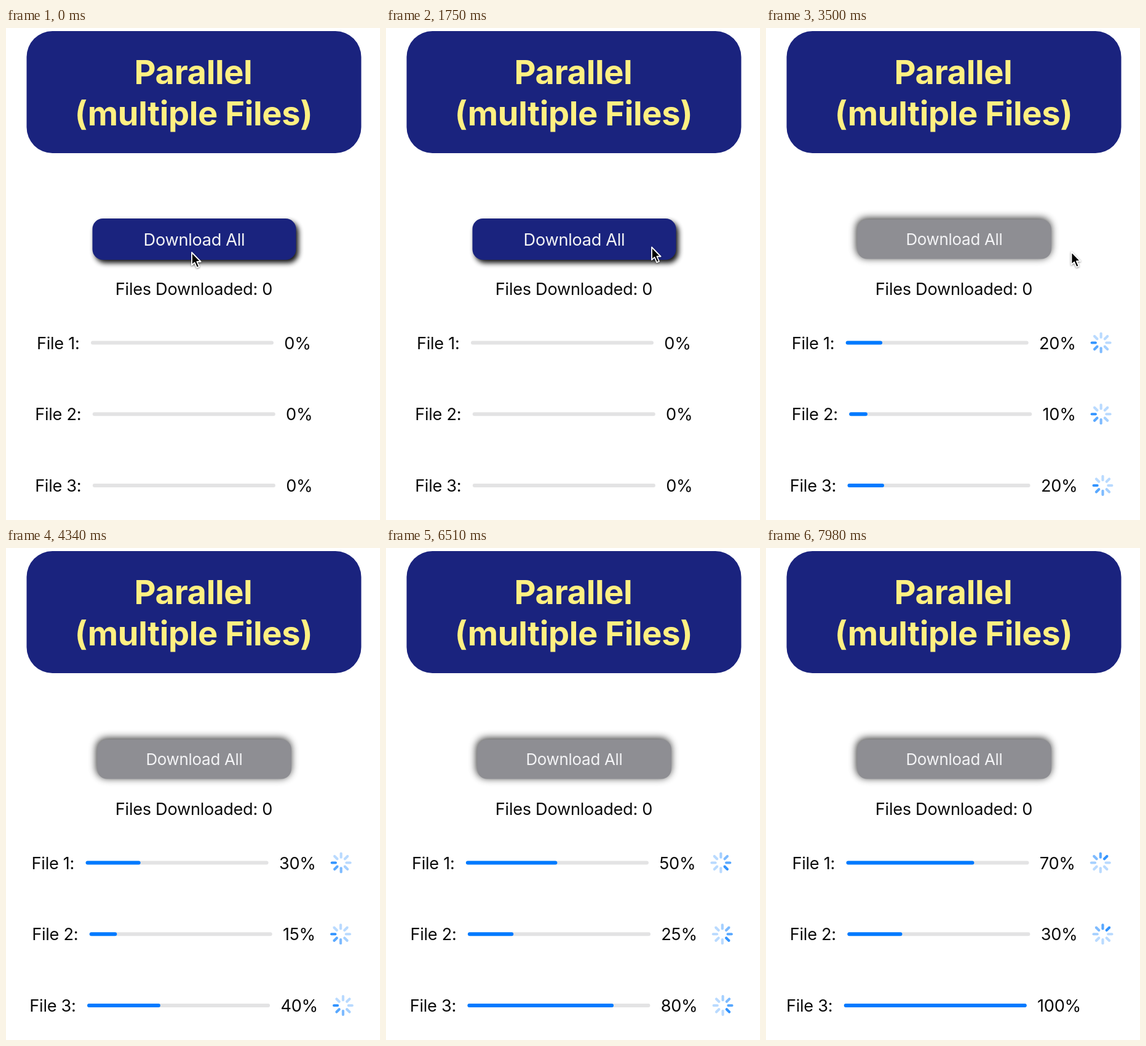
An HTML page for the animation above (8 s loop, 608 px wide and 798 px high).

```html
<!DOCTYPE html>
<html lang="en">
<head>
<meta charset="utf-8">
<title>Parallel downloads</title>
<style>
  html, body { margin: 0; width: 100%; height: 100%; overflow: hidden; background: #fff; }
  svg { display: block; width: 608px; height: 798px; }
  text { font: 400 27.2px Inter, "Noto Sans", sans-serif; letter-spacing: -0.3px; fill: #0c0c0c; }
  .title { font-size: 54.2px; font-weight: 700; letter-spacing: -0.4px; fill: #fff082; }
  .mid { text-anchor: middle; }
  .caption { fill: #f4f4f6; }
</style>
</head>
<body>
<svg viewBox="0 0 608 798">
  <rect x="33.5" y="5" width="544" height="198" rx="42" fill="#1a237e"/>
  <text class="title mid" x="304.5" y="90.5">Parallel</text>
  <text class="title mid" x="305" y="157.5">(multiple Files)</text>
  <g id="button">
    <rect id="shadow" x="-165.5" y="-33.5" width="331" height="67" rx="17"/>
    <rect id="face" x="-165.5" y="-33.5" width="331" height="67" rx="17"/>
    <text class="mid caption" y="10">Download All</text>
  </g>
  <text class="mid" x="305.5" y="432.5">Files Downloaded: 0</text>
  <g id="rows"></g>
  <path id="cursor" d="M0 0V20.5L4.6 16.4L8.2 24.6L12 23L8.4 15H14.6Z" fill="#000" stroke="#fff"
    stroke-width="1.8" stroke-linejoin="round" style="filter: drop-shadow(0 1.5px 1.5px #0007)"/>
</svg>
<script>
const LOOP = 8000, TICK = 70, START = 2420;
const BAR = 297, FIRST_BAR_LEFT = 138, SPIN_STEP = 105;
const byId = id => document.getElementById(id);

function set(node, attrs) {
  for (const key in attrs) node.setAttribute(key, attrs[key]);
}

function add(parent, tag, attrs = {}) {
  const node = document.createElementNS('http://www.w3.org/2000/svg', tag);
  set(node, attrs);
  return parent.appendChild(node);
}

const mix = (a, b, k) => a + (b - a) * k;

// Smooth 0 to 1 between two times
function ease(from, to, t) {
  const k = Math.min(1, Math.max(0, (t - from) / (to - from)));
  return k * k * (3 - 2 * k);
}

const pen = document.createElement('canvas').getContext('2d');
pen.font = '27.2px Inter, "Noto Sans", sans-serif';
const extraWidth = (text, base) => pen.measureText(text).width - pen.measureText(base).width;

function makeFile(index, step, every) {
  const g = add(byId('rows'), 'g', { transform: `translate(0 ${510.5 + 115.75 * index})` });
  const label = `File ${index + 1}:`;
  const name = add(g, 'text', { y: 10 });
  name.textContent = label;
  const bar = fill => add(g, 'rect', { y: -3, width: BAR, height: 6, rx: 3, fill });
  const track = bar('#e3e3e4'), done = bar('#007aff');
  const percent = add(g, 'text', { y: 10 });
  const spinner = add(g, 'g');
  const spokes = Array.from({ length: 8 }, (_, n) => add(spinner, 'path', {
    d: 'M0 -8.8V-14.9', transform: `rotate(${n * 45})`,
    stroke: '#007aff', 'stroke-width': 4.2, 'stroke-linecap': 'round'
  }));
  return { step, every, name, track, done, percent, spinner, spokes,
    labelExtra: extraWidth(label, 'File 1:') };
}

const files = [makeFile(0, 10, 900), makeFile(1, 5, 950), makeFile(2, 20, 1200)];

// Each row stays centred, so it shifts by half of any added text width
function drawFile(file, t) {
  const steps = t < START ? 0 : 1 + Math.floor((t - START) / file.every);
  const value = Math.min(100, steps * file.step);
  const text = value + '%';
  const left = FIRST_BAR_LEFT + (file.labelExtra - extraWidth(text, '0%')) / 2;
  const labelLeft = left - 88 - file.labelExtra;

  set(file.name, { x: labelLeft });
  set(file.track, { x: left });
  set(file.done, { x: left, width: BAR * value / 100 });
  set(file.percent, { x: left + 314.3 });
  file.percent.textContent = text;
  set(file.spinner, {
    transform: `translate(${586.3 - labelLeft} 0)`,
    visibility: value > 0 && value < 100 ? 'visible' : 'hidden'
  });

  const lead = Math.floor((t - START) / SPIN_STEP + 0.2) + 4;
  file.spokes.forEach((spoke, n) => {
    const age = (lead - n + 80) % 8;
    set(spoke, { opacity: Math.max(0.27, 0.8 - age * 0.15) });
  });
}

function drawButton(t) {
  const press = ease(START - 70, 2660, t), release = ease(2740, 3150, t);
  const scale = 1 - 0.092 * press + 0.046 * release;
  set(byId('button'), { transform: `translate(306 342.5) scale(${scale})` });
  set(byId('face'), { fill: t < START ? '#1a237e' : '#8e8e93' });
  set(byId('shadow'), {
    transform: `translate(${mix(4, -1, press)} ${mix(5, -2, press)})`,
    opacity: mix(0.95, 0.85, press),
    style: `filter: blur(${mix(4.5, 6.5, press)}px)`
  });
}

// Pointer stops as [time, x, y]
const stops = [
  [0, 302, 364], [700, 576, 366], [1750, 432, 355.5], [2100, 125, 364],
  [2400, 286.5, 355], [2800, 286.5, 355], [3850, 570, 366]
];

function drawCursor(t) {
  const next = stops.findIndex(stop => stop[0] > t);
  set(byId('cursor'), { visibility: next > 0 ? 'visible' : 'hidden' });
  if (next < 1) return;
  const [t0, x0, y0] = stops[next - 1], [t1, x1, y1] = stops[next];
  const k = ease(t0, t1, t);
  set(byId('cursor'), { transform: `translate(${mix(x0, x1, k)} ${mix(y0, y1, k)})` });
}

const begin = performance.now();
function frame() {
  const elapsed = performance.now() - begin;
  const t = Math.floor(elapsed % LOOP / TICK) * TICK;
  drawButton(t);
  files.forEach(file => drawFile(file, t));
  drawCursor(t);
  requestAnimationFrame(frame);
}
frame();
</script>
</body>
</html>
```
